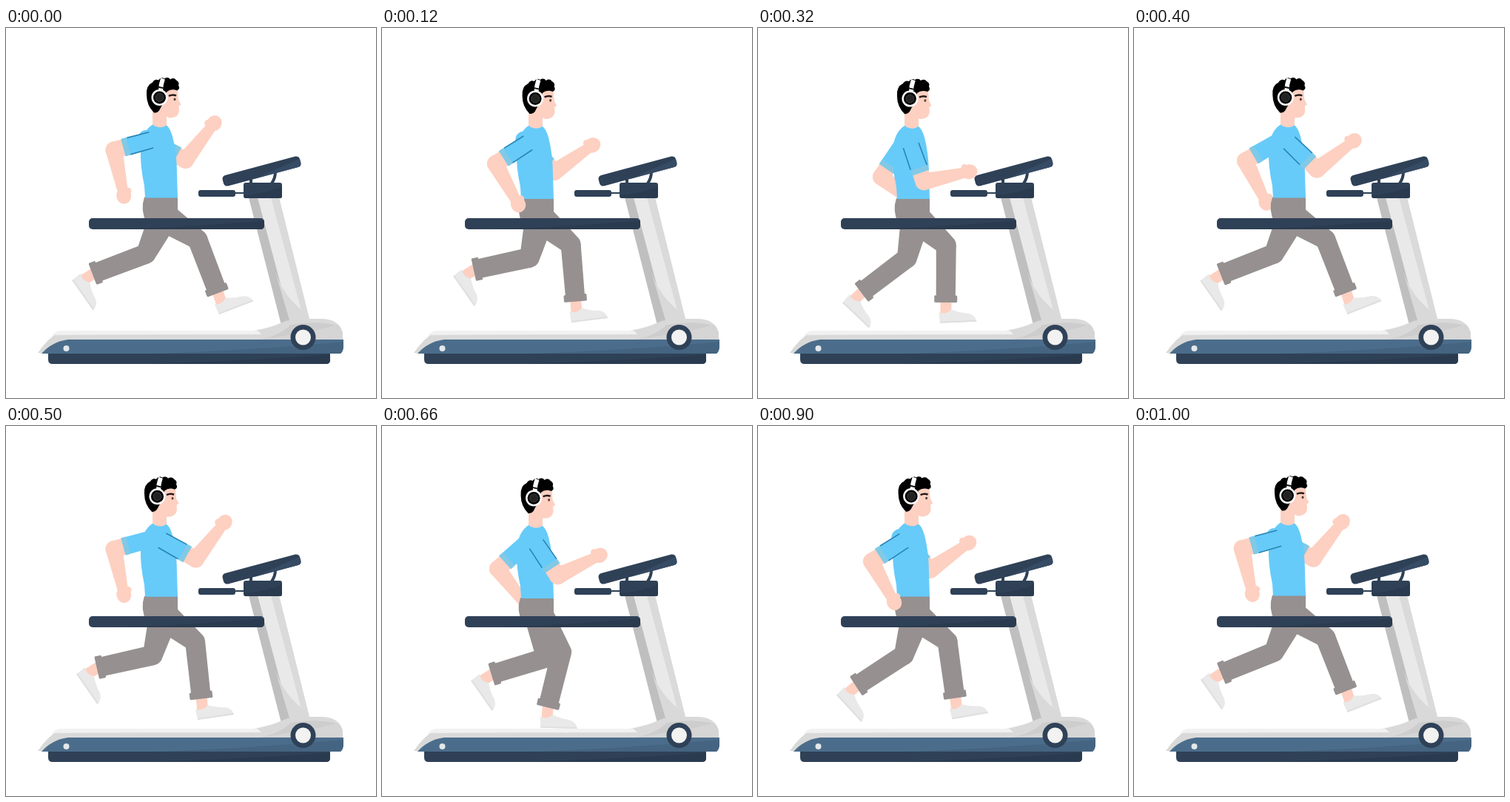
An HTML page for the animation above (1040 ms loop, 500x500 px).

```html
<!DOCTYPE html>
<html lang="en">
<head>
<meta charset="utf-8">
<title>Treadmill run</title>
<style>
html, body { margin: 0; width: 100%; height: 100%; overflow: hidden; background: #fff; }
svg { display: block; width: 100vw; height: 100vh; }
.skin { fill: #fdd0c1; }
.shirt { fill: #66cbf9; }
.cuff { fill: #82c9e6; }
.pants { fill: #969090; }
.navy { fill: #2f4157; }
.shade { fill: #2a3b4f; }
.seam { fill: none; stroke: #2a84b2; stroke-width: 1.6; }
</style>
</head>
<body>
<svg viewBox="0 0 500 500">
  <g id="machine">
    <path fill="#e9e9e9" d="M328 229H369L410 393L372 401Z"/>
    <path fill="#bfbfbf" d="M328 229H340L385 399L372 401Z"/>
    <path fill="#dadada" d="M358 229H369L410 393L403 396Z"/>
    <path fill="#d9d9d9" d="M364 330Q376 365 405 385L410 394L384 398Z"/>
    <path fill="none" stroke="#2f4157" stroke-width="4" d="M364 194Q364 203 359 210M331 203V210"/>
    <path stroke="#2f4157" stroke-width="2" d="M308 223H323"/>
    <rect class="navy" x="260" y="219" width="50" height="9" rx="3"/>
    <rect class="navy" x="321" y="209" width="52" height="21" rx="3"/>
    <path class="shade" d="M322 226Q350 224 373 214V227Q373 230 370 230H324Q321 230 322 226Z"/>
    <g transform="translate(345.5 193.5) rotate(-15)">
      <rect class="navy" x="-54" y="-7.5" width="108" height="15" rx="5"/>
      <path fill="#364b64" d="M-12 7.500Q20 2 54 -3V2.500Q54 7.500 49 7.500Z"/>
    </g>
    <path class="navy" d="M57 438H438V449Q438 454 432 454H63Q57 454 57 448Z"/>
    <path class="shade" d="M180 454Q330 450 438 441V449Q438 454 432 454Z"/>
    <path fill="#d9d9d9" d="M43 439Q55 421 72 410L335 409Q358 405 373 398Q384 393 400 393H428Q450 394 455 411V425H90L57 440Z"/>
    <path fill="#f1f1f1" d="M62 415Q66 410 74 409H340L345 414Q200 414 62 415Z"/>
    <path fill="#cdcdcd" d="M385 401Q420 395 447 402Q455 408 455 421H345Q372 414 385 401Z"/>
    <path fill="#d5d5d5" d="M345 420Q400 414 446 402Q455 409 455 421Z"/>
    <path fill="#4b6d8b" d="M48 440Q62 424 84 421H456V429Q456 437 452 440Z"/>
    <path fill="#446481" d="M200 440Q340 435 456 424V429Q456 437 452 440Z"/>
    <circle cx="81.500" cy="433" r="4" fill="#e4e8ea"/>
    <circle class="navy" cx="401.500" cy="418" r="17"/>
    <circle cx="401.500" cy="418" r="10.500" fill="#f2f2f2"/>
  </g>
  <g id="farArm"></g>
  <g id="farLeg"></g>
  <g id="nearLeg"></g>
  <g id="trunk">
    <path class="pants" d="M187 229H232V249L238 259V264H190Q181 246 187 229Z"/>
    <path class="skin" d="M198 110H217V134Q207 139 198 133Z"/>
    <path class="shirt" d="M198 131Q208 138 217 132Q222 136 225 147Q231 170 231 198L232 230H188L187 214Q181 186 182 164Q184 140 198 131Z"/>
  </g>
  <g id="head">
    <path class="skin" d="M203 84H232L233 97L236.500 104L233.500 106L234 112Q233 122 221 122L214 119L200 116Z"/>
    <path d="M200 115Q190 105 190 91Q189 78 198 74Q201 69 206 71Q210 66 214 69Q219 66 222 70Q227 67 230 71Q235 74 233 78Q236 83 231 85Q223 82 217 87L215 100Q210 105 207 112Q204 116 200 115Z"/>
    <path fill="none" stroke="#241a1a" stroke-width="2.500" d="M220 92.500Q225 90 230 92"/>
    <ellipse cx="228" cy="97" rx="1.500" ry="1.800" fill="#5a4038"/>
    <path fill="none" stroke="#fff" stroke-width="6" d="M209 86Q209 77 212 69"/>
    <path fill="none" stroke="#111" stroke-width="2" d="M205 80L214 82"/>
    <circle cx="207.500" cy="94.500" r="11" fill="#fff"/>
    <circle cx="207.500" cy="94.500" r="8.500"/>
    <circle cx="207.500" cy="94.500" r="5.500" fill="#222" stroke="#555" stroke-width=".6"/>
  </g>
  <g id="nearArm"></g>
  <g id="rail">
    <rect class="navy" x="112" y="257" width="237" height="15" rx="5"/>
    <path class="shade" d="M150 272Q270 268 349 260V267Q349 272 344 272Z"/>
  </g>
</svg>
<script>
const LOOP = 1040, STEP = 20, LAST = LOOP - 2 * STEP;   // the last pose is held twice as long
const THIGH = 55, SHIN = 77, UPPER_ARM = 60, FOREARM = 63;
const BELT = 409, ANKLE = 28, TOE = 40;
const NS = 'http://www.w3.org/2000/svg';
const byId = id => document.getElementById(id);

function add(parent, tag, attrs) {
  const el = document.createElementNS(NS, tag);
  for (const k in attrs) el.setAttribute(k, attrs[k]);
  return parent.appendChild(el);
}

// All angles are in degrees, clockwise from pointing right.
const rad = deg => deg * Math.PI / 180;
const deg = r => r * 180 / Math.PI;
const cos = a => Math.cos(rad(a)), sin = a => Math.sin(rad(a));
const reach = ([x, y], a, length) => [x + cos(a) * length, y + sin(a) * length];
const place = (p, a) => `translate(${p}) rotate(${a})`;

// Mean plus harmonics, each given as [cosine part, sine part].
const wave = (a, mean, ...parts) =>
  parts.reduce((sum, [c, s], i) => sum + c * cos(a * (i + 1)) + s * sin(a * (i + 1)), mean);

// One gait serves both legs, one swing serves both arms; the other side runs half a turn later.
const stride = turn => turn + wave(turn, 16, [-19, 0], [4, -6]);
const thighAngle = a => wave(a, 71.5, [-41, 0], [3, 0]);
const shinAngle = a => wave(a, 123, [-45, -15], [-9, 5.5], [0, 3.6]);
const upperAngle = a => 97 + 68 * cos(a);
const foreAngle = a => 13 + 65 * cos(a);

// The foot follows the shin until its toe meets the belt.
function footAngle(shin, ankleY) {
  const free = 0.88 * shin - 82;
  const lift = Math.min(1, (BELT - ankleY) / Math.hypot(TOE, ANKLE));
  return Math.min(free, deg(Math.asin(lift) - Math.atan2(ANKLE, TOE)));
}

// Tapered limb starting at a joint, with round or flat ends.
function limb(from, a, length, r0, r1, round = true) {
  const to = reach(from, a, length);
  const edge = (p, r) => reach(p, a + 90, r);
  const cap = r => round ? `A${r} ${r} 0 0 1 ` : 'L';
  return `M${edge(from, r0)}${cap(r0)}${edge(from, -r0)}L${edge(to, -r1)}${cap(r1)}${edge(to, r1)}Z`;
}

function makeLeg(id) {
  const g = byId(id), foot = add(g, 'g', {});
  add(foot, 'path', { class: 'skin', d: 'M2 -32H17L16 -12H1Z' });
  add(foot, 'path', { fill: '#e9e9e9', d: 'M0 0L-1 -15Q8 -10 16 -18Q26 -13 39 -11.500Q48 -9 49.500 0Z' });
  add(foot, 'path', { fill: '#dfdfdf', d: 'M0 0V-2H49L49.500 0Z' });
  const thigh = add(g, 'path', { class: 'pants' });
  const shin = add(g, 'path', { class: 'pants' });
  const hem = add(g, 'rect', { class: 'pants', x: -9, y: -15.5, width: 9.5, height: 31, rx: 1.5 });
  return (phase, drop) => {
    const hip = [213, 256 + drop], ta = thighAngle(phase), sa = shinAngle(phase);
    const knee = reach(hip, ta, THIGH), end = reach(knee, sa, SHIN);
    thigh.setAttribute('d', limb(hip, ta, THIGH, 20, 13.5));
    shin.setAttribute('d', limb(knee, sa, SHIN, 13.5, 13, false));
    hem.setAttribute('transform', place(end, sa));
    foot.setAttribute('transform', place(end, footAngle(sa, end[1])) + ` translate(-9 ${ANKLE})`);
  };
}

function makeArm(id, seams) {
  const g = byId(id);
  const upper = add(g, 'path', { class: 'skin' });
  const fore = add(g, 'path', { class: 'skin' });
  const hand = add(g, 'g', { class: 'skin' });
  add(hand, 'ellipse', { rx: 11, ry: 10 });
  add(hand, 'circle', { cx: -5, cy: -7, r: 4.5 });
  const sleeve = add(g, 'g', {});
  add(sleeve, 'path', { class: 'shirt', d: limb([0, 0], 0, 12, 11.5, 11.5) + limb([0, 0], 0, 47, 11.5, 12, false) });
  add(sleeve, 'rect', { class: 'cuff', x: 40, y: -12, width: 7, height: 24 });
  if (seams) add(sleeve, 'path', { class: 'seam', d: 'M8 -11L40 -11.500M8 11L39 11.500' });
  return (phase, x, drop) => {
    const shoulder = [x, 150 + drop], ua = upperAngle(phase), fa = foreAngle(phase);
    const elbow = reach(shoulder, ua, UPPER_ARM);
    upper.setAttribute('d', limb(shoulder, ua, UPPER_ARM, 10, 11.5));
    fore.setAttribute('d', limb(elbow, fa, FOREARM, 11.5, 6.5));
    hand.setAttribute('transform', place(reach(elbow, fa, FOREARM), fa));
    sleeve.setAttribute('transform', place(shoulder, ua));
  };
}

const nearLeg = makeLeg('nearLeg'), farLeg = makeLeg('farLeg');
const nearArm = makeArm('nearArm', true), farArm = makeArm('farArm', false);
const trunk = byId('trunk'), head = byId('head');

function draw(ms) {
  const t = Math.min(LAST, Math.floor(ms % LOOP / STEP) * STEP);
  const turn = 360 * t / (LAST + STEP), gait = stride(turn);
  const drop = 1.3 - 1.9 * cos(2 * gait);
  const twist = cos(turn);
  nearLeg(gait, drop);
  farLeg(gait + 180, drop);
  nearArm(turn, 204, drop);
  farArm(turn + 180, 197 - 7 * twist, drop);
  trunk.setAttribute('transform', `translate(0 ${drop})`);
  head.setAttribute('transform', `translate(${1.5 * twist - 1.5} ${drop})`);
}

const start = performance.now();
function tick() {
  draw(performance.now() - start);
  requestAnimationFrame(tick);
}
tick();
</script>
</body>
</html>
```
